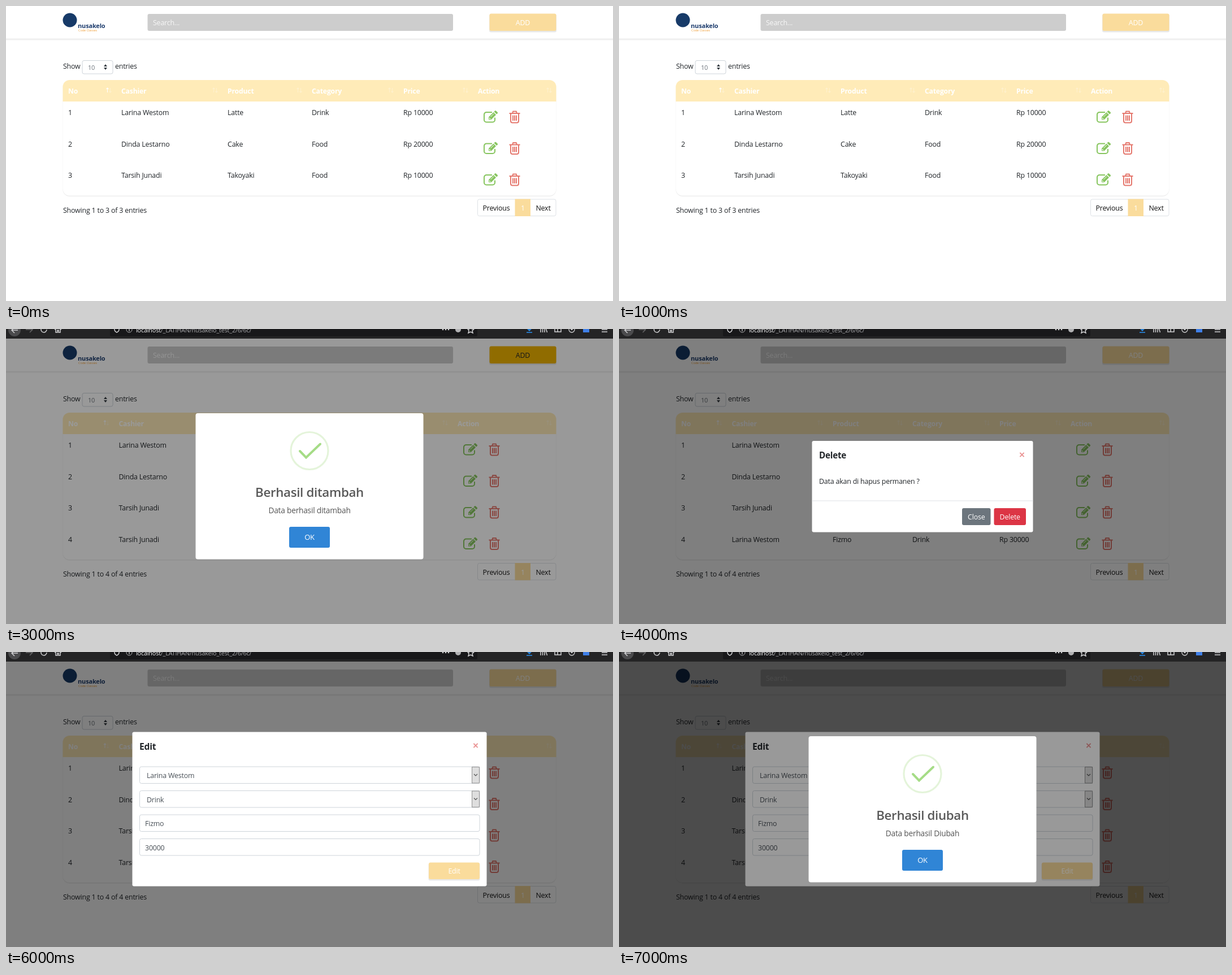
Recreate the animation shown at these times as an HTML page. Size 1074 by 522 pixels, loop 8000 ms.

```html
<!DOCTYPE html>
<html lang="id">
<head>
<meta charset="utf-8">
<title>Cashier table</title>
<style>
html, body { margin: 0; width: 100%; height: 100%; overflow: hidden; background: #fff; }
svg { display: block; }
text { font-family: "Open Sans", "Noto Sans", sans-serif; letter-spacing: -.015em; white-space: pre; }
</style>
</head>
<body>
<svg id="stage" width="1074" height="522" viewBox="0 0 1074 522"></svg>
<script>
const INK = '#212529', FIELD_INK = '#495057', SAND = '#fadc9c', BORDER = '#ced4da';
const BRAND = 'nusakelo';
const CASHIERS = ['Larina Westom', 'Dinda Lestarno', 'Tarsih Junadi'];
const [LARINA, DINDA, TARSIH] = CASHIERS;

// Drawing helpers: each returns SVG markup
const text = (x, y, s, { fill = INK, size = 12.4, weight = 400, anchor = 'start' } = {}) =>
  `<text x="${x}" y="${y}" fill="${fill}" font-size="${size}" font-weight="${weight}" text-anchor="${anchor}">${s}</text>`;
const centered = (x, y, s, options = {}) => text(x, y, s, { anchor: 'middle', ...options });
const rect = (x, y, w, h, fill, rx = 0, extra = '') =>
  `<rect x="${x}" y="${y}" width="${w}" height="${h}" rx="${rx}" fill="${fill}" ${extra}/>`;
const box = (x, y, w, h, stroke = BORDER) => rect(x, y, w, h, '#fff', 3, `stroke="${stroke}"`);
const path = (d, stroke, width = 1, extra = '') =>
  `<path d="${d}" fill="none" stroke="${stroke}" stroke-width="${width}" ${extra}/>`;
const shape = (d, fill) => `<path d="${d}" fill="${fill}"/>`;
const circle = (x, y, r, fill, extra = '') => `<circle cx="${x}" cy="${y}" r="${r}" fill="${fill}" ${extra}/>`;
const group = (x, y, content) => `<g transform="translate(${x} ${y})">${content}</g>`;

const button = (x, y, w, h, label, fill, ink = '#fff', size = 12.4) =>
  rect(x, y, w, h, fill, 3) + centered(x + w / 2, y + h / 2 + 4.8, label, { fill: ink, size });
const raisedButton = (x, y, w, h, label, fill, ink) =>
  rect(x - .5, y + 1, w + 1, h + 1.5, '#000', 3, 'opacity=".09"') + button(x, y, w, h, label, fill, ink);
const cross = (x, y) => path(`M${x - 3.6} ${y - 3.6}l7.2 7.2m0 -7.2l-7.2 7.2`, '#ea9494', 2);
const shade = (top, opacity) => rect(0, top, 1074, 522 - top, '#000', 0, `opacity="${opacity}"`);

const editIcon = (x, y) => group(x, y,
  path('M15 3.5H5a4 4 0 0 0-4 4V17a4 4 0 0 0 4 4h11a4 4 0 0 0 4-4v-4', '#87c55f', 2) +
  shape('M9 12L17.5 3.5L22 8L13.5 16.5H9ZM18.5 2.5L20 1a1.5 1.5 0 0 1 2 0l2.7 2.6a1.5 1.5 0 0 1 0 2L23 7Z', '#87c55f') +
  path('M12.5 11.5l5.5 -5.5M10.5 13v2h2', '#fff', 1));
const trashIcon = (x, y) => group(x, y,
  path('M.5 4.5h19M6 4.5L7.2 1h5.6L14 4.5M3 4.5V18a3 3 0 0 0 2.5 3h9a3 3 0 0 0 2.5-3V4.5M7 8v9.5M10 8v9.5M13 8v9.5', '#e5786e', 2));
const sortIcon = (x, y, active) =>
  path(`M${x - 2.5} ${y + 4}v-8m-2 2l2 -2l2 2`, '#fff', 1.1, `opacity="${active ? 1 : .3}"`) +
  path(`M${x + 2.5} ${y - 4}v8m-2 -2l2 2l2 -2`, '#fff', 1.1, 'opacity=".3"');

function browserBar() {
  const line = (d, color = '#d0d0d2') => path(d, color, 1.5);
  return rect(0, 0, 1074, 17, '#242425') + rect(184, -5, 650, 18, '#18181a', 2) +
    circle(15, 2, 11, '#4b4b4d') + line('M21 2H10m5 -5l-5 5l5 5') +
    line('M35 1h12m-5 -5l5 5l-5 5', '#656567') +
    line('M72 1a5 5 0 1 1 -2 -4') + line('M86 1l6 -5l6 5M88 0v6h3v-4h2v4h3v-6') +
    line('M192 -2v3q0 3 4 5q4 -2 4 -5v-3') +
    circle(218, 1, 5, 'none', 'stroke="#b1b1b3"') + line('M218 0v4', '#b1b1b3') +
    text(230, 6, `localhost<tspan fill="#a5a5a8">/_LATIHAN/${BRAND}_test_2/6/6c/</tspan>`, { fill: '#f4f4f5', size: 10.8 }) +
    [773, 778, 783].map(x => circle(x, 1, 1.3, '#d0d0d2')).join('') +
    circle(800, 1, 5, '#b1b1b3') +
    line('M817 0h3l2 -4l2 4h4l-3 3l1 4l-4 -2l-4 2l1 -4z') +
    line('M926 -4v7m-3 -3l3 3l3 -3M921 6h10', '#2a91f2') +
    line('M946 -4v10m3.5 -10v10m3.5 -10v10m1.5 -9l3 9') +
    line('M971 -4h11v9h-11zM976 -4v9') +
    circle(1001, 1, 5, 'none', 'stroke="#d0d0d2" stroke-width="1.3"') + circle(1001, 0, 2, '#d0d0d2') +
    rect(1021, -4, 11, 10, '#3f7fe8') +
    line('M1054 -3h10m-10 4h10m-10 4h10');
}

function header(addPressed) {
  return rect(0, 57, 1074, 4, '#000', 0, 'opacity=".03"') + rect(0, 58, 1074, 1.5, '#000', 0, 'opacity=".04"') +
    circle(113, 25, 12.5, '#173a68') +
    text(127, 38.5, BRAND, { fill: '#1d3c6d', size: 11, weight: 700 }) +
    text(128, 44.5, 'Code Classes', { fill: '#f0a03c', size: 5.6 }) +
    rect(250.5, 14, 540.5, 30, '#cdcdcd', 3) + text(260, 34, 'Search...', { fill: '#f7f7f7' }) +
    raisedButton(855.5, 13.5, 118, 30.5, 'ADD', addPressed ? '#f0b400' : SAND, addPressed ? INK : '#fff');
}

function table(rows, columns, total) {
  const titles = ['No', 'Cashier', 'Product', 'Category', 'Price', 'Action'];
  const pitch = 55.5, top = 169, bottom = top + rows.length * pitch;
  const actionX = columns[5];
  const head = titles.map((title, i) =>
    text(columns[i], 155, title, { fill: '#fff', weight: 700, size: 12.2 }) +
    sortIcon(i < 5 ? columns[i + 1] - 22 : 961, 149, i === 0)).join('');
  const body = rows.map((row, i) => {
    const y = top + i * pitch;
    return [i + 1, ...row].map((cell, c) => text(columns[c], y + 24, cell)).join('') +
      editIcon(actionX + 10, y + 15.5) + trashIcon(actionX + 55, y + 16.5);
  }).join('');

  return text(101, 111, 'Show') + box(135, 96.5, 54, 23.5) +
    text(145, 112.5, '10', { fill: '#6b7279', size: 11 }) +
    shape('M173 107l3 -4l3 4zM173 109l3 4l3 -4z', '#343a40') + text(193, 111, 'entries') +
    rect(100, 132, 874, bottom - 130, '#000', 13, 'opacity=".035"') +
    rect(100.5, 132, 873, bottom - 131, '#000', 12, 'opacity=".04"') +
    rect(100.5, 131, 873, bottom - 131, '#fff', 12) +
    shape('M100.5 169v-26a12 12 0 0 1 12 -12h849a12 12 0 0 1 12 12v26z', '#ffebb8') + head + body +
    text(101, bottom + 30, `Showing 1 to ${total} of ${total} entries`) +
    group(0, bottom + 6.5,
      box(834.5, 0, 138.5, 29.5, '#dee2e6') + rect(900.5, -.5, 27.5, 30.5, SAND) +
      centered(867.5, 20, 'Previous', { fill: '#111' }) +
      centered(914.5, 20, '1', { fill: '#fff' }) + centered(950.5, 20, 'Next', { fill: '#111' }));
}

function formModal(offset, title, action, values) {
  const fields = values.map((value, i) => {
    const y = 186 + i * 42.5, isSelect = i < 2;
    return box(236.5, y, 601.5, 29.5) + text(isSelect ? 249 : 246, y + 20.3, value, { fill: FIELD_INK }) +
      (isSelect ? rect(824.5, y + .5, 13, 28.5, '#dedede', 0, 'stroke="#929292"') +
        path(`M828 ${y + 13}l3 3l3 -3`, '#555', 1.2) : '');
  }).join('');
  return group(0, offset,
    rect(223.5, 124.5, 627, 273, '#fff', 3) +
    text(236, 155.5, title, { size: 15.7, weight: 700 }) + cross(831, 148.5) + fields +
    raisedButton(748, 355.5, 90, 29.5, action, SAND));
}

function deleteModal() {
  return rect(341.5, 198, 391, 161.5, '#fff', 3) +
    text(354, 228.5, 'Delete', { size: 15.2, weight: 700 }) + cross(713, 222.5) +
    text(354, 273.5, 'Data akan di hapus permanen ?') + rect(341.5, 303.5, 391, 1, '#dee2e6') +
    button(607, 317, 50.5, 30, 'Close', '#6c757d') + button(663.5, 317, 56.5, 30, 'Delete', '#dc3545');
}

function successAlert(title, message) {
  return rect(335.5, 149, 403, 258.5, '#fff', 4) +
    circle(537, 215.5, 33, 'none', 'stroke="#e4f4da" stroke-width="3.2"') +
    path('M520 216l11 11.5l25 -24', '#a5dc86', 4, 'stroke-linecap="round"') +
    centered(537, 297, title, { fill: '#595959', size: 22.3, weight: 600 }) +
    centered(537, 326, message, { fill: '#545454', size: 13.7 }) +
    button(501, 350, 72, 37, 'OK', '#3085d6', '#fff', 13);
}

const baseRows = [
  [LARINA, 'Latte', 'Drink', 'Rp 10000'],
  [DINDA, 'Cake', 'Food', 'Rp 20000'],
  [TARSIH, 'Takoyaki', 'Food', 'Rp 10000']
];
const sodaRow = [TARSIH, 'Soda', 'Drink', '10000'];
const editedRow = [LARINA, 'Fizmo', 'Drink', 'Rp 30000'];
const wideColumns = [110, 204, 392, 541, 703, 835];
const narrowColumns = [110, 199.5, 378, 519, 673, 799];

const shortPage = () => header() + table(baseRows, wideColumns, 3);
const longPage = (extraRows, addPressed) =>
  group(0, 17, header(addPressed) + table([...baseRows, ...extraRows], narrowColumns, 4)) + browserBar();
const editPage = () => longPage([sodaRow]) + shade(17, .5) +
  formModal(17, 'Edit', 'Edit', [LARINA, 'Drink', 'Fizmo', '30000']);

const scenes = [
  { start: 0, draw: shortPage },
  { start: 2000, draw: () => shortPage() + shade(0, .5) + formModal(0, 'ADD', 'Add', [TARSIH, 'Drink', 'Soda', '10000']) },
  { start: 3000, draw: () => longPage([sodaRow], true) + shade(17, .4) + successAlert('Berhasil ditambah', 'Data berhasil ditambah') },
  { start: 4000, draw: () => longPage([editedRow]) + shade(17, .5) + deleteModal() },
  { start: 5000, draw: () => longPage([sodaRow, sodaRow]) + shade(17, .4) + successAlert('Berhasil dihapus', 'Data Berhsail Di Hapus') },
  { start: 6000, draw: editPage },
  { start: 7000, draw: () => editPage() + shade(17, .4) + successAlert('Berhasil diubah', 'Data berhasil Diubah') }
];

const stage = document.getElementById('stage');
const origin = performance.now();
let shown;
function tick() {
  const time = (performance.now() - origin) % 8000;
  const scene = scenes.findLast(s => s.start <= time);
  if (scene !== shown) {
    stage.innerHTML = scene.draw();
    shown = scene;
  }
  requestAnimationFrame(tick);
}
tick();
</script>
</body>
</html>
```
